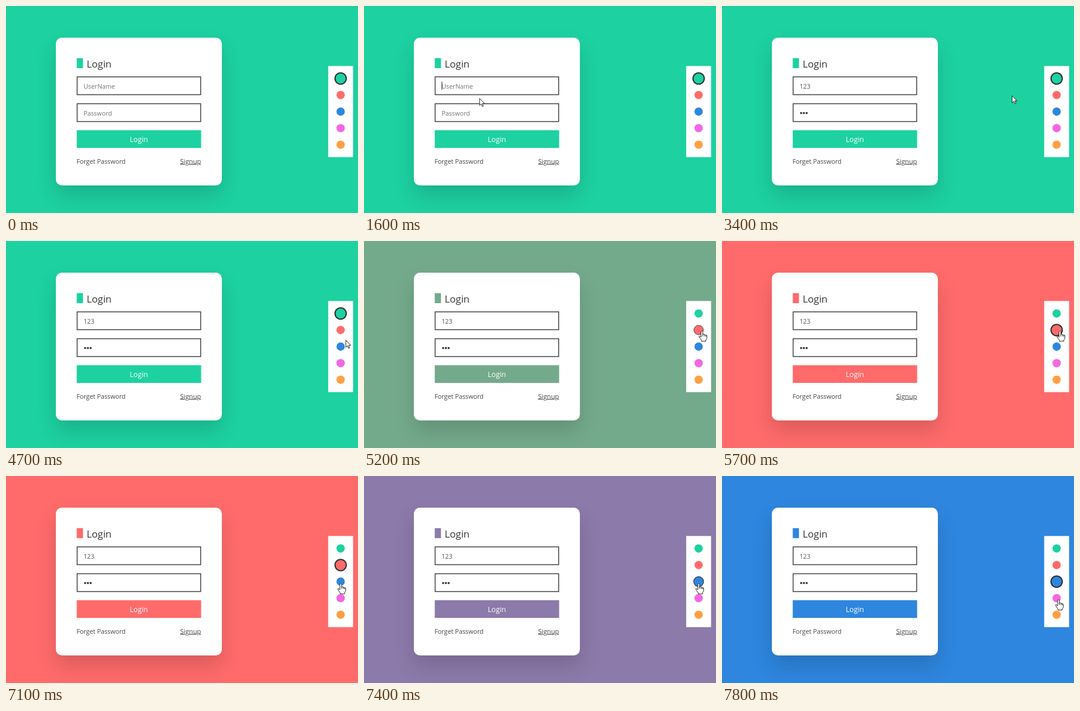
These frames come from a looping animation (600 px wide and 353 px high, 8 s). An HTML page:

```html
<!DOCTYPE html>
<html lang="en">
<head>
<meta charset="utf-8">
<title>Login form with theme picker</title>
<style>
  html, body { margin: 0; width: 100%; height: 100%; overflow: hidden; }
  body { position: relative; background: var(--theme); --theme: #1dd1a1; }
  .card {
    position: absolute; left: 85.3px; top: 53.7px; width: 282.6px; height: 252.6px;
    border-radius: 10.6px; background: #fff; box-shadow: 0 17.6px 35px rgba(0, 0, 0, .15);
  }
  svg { position: absolute; left: 0; top: 0; display: block; }
  text { font: 10.8px "Open Sans", "Noto Sans", sans-serif; fill: #444; }
  .title { font-size: 16.7px; fill: #333; }
  .button { font-size: 12.2px; fill: #fff; text-anchor: middle; }
  .signup { font-size: 11.2px; text-anchor: end; text-decoration: underline; }
  .hint { fill: #757575; }
  .value { fill: #555; }
  .theme { fill: var(--theme); }
  .field { fill: #fff; stroke: #444; stroke-width: 1.5; }
  .cursor path { fill: #fff; stroke: #222; stroke-width: 1; stroke-linejoin: round; }
</style>
</head>
<body>
<div class="card"></div>
<svg width="600" height="353" viewBox="0 0 600 353">
  <rect class="theme" x="120.6" y="89" width="10.6" height="17"/>
  <text class="title" x="137.5" y="104.5">Login</text>

  <rect class="field" x="121.3" y="120.8" width="210.5" height="30.5"/>
  <rect class="field" x="121.3" y="166.6" width="210.5" height="30.5"/>
  <text id="user" x="132.2" y="140.5"></text>
  <text id="passHint" class="hint" x="132.2" y="186.5">Password</text>
  <g id="bullets" fill="#333">
    <circle cx="134.9" cy="182.6" r="1.8"/>
    <circle cx="139.6" cy="182.6" r="1.8"/>
    <circle cx="144.3" cy="182.6" r="1.8"/>
  </g>
  <rect id="caret" width="1" height="14" fill="#222"/>

  <rect class="theme" x="120.6" y="211.8" width="212" height="30.2"/>
  <text class="button" x="226.5" y="232">Login</text>
  <text x="120.2" y="268.5">Forget Password</text>
  <text class="signup" x="332.4" y="268.5">Signup</text>

  <rect x="549.2" y="102.3" width="42.4" height="155.4" fill="#fff"/>
  <g id="dots"></g>

  <g id="cursor" class="cursor">
    <path id="arrow" d="M.5 .5V12.6L3.3 10 5.2 14.3 7.1 13.5 5.2 9.3H9Z"/>
    <path id="beam" d="M-2-6.5H2M0-6.5V6.5M-2 6.5H2"/>
    <path id="hand" d="M-1.5 1.5Q0-1 1.5 1.5V7L2 6Q3.8 5.2 4.4 6.8 6 6 6.6 7.6 8.2 7 8.4 9V12.5Q8 14.5 6.5 16V18H-.8V16.3L-4.6 11Q-5.6 8.8-3.6 9L-1.5 11ZM1.5 7V9.5M4.4 6.8V9.7M6.6 7.6V10"/>
  </g>
</svg>
<script>
const $ = id => document.getElementById(id);
const LOOP = 8000, STEP = 100, FADE = 500;
const palette = [[29, 209, 161], [255, 107, 107], [46, 134, 222], [243, 104, 224], [255, 159, 67]];
const picks = [{ at: -FADE, color: 0 }, { at: 5080, color: 1 }, { at: 7240, color: 2 }];
const userKeys = [1900, 2100, 2300];
const passKeys = [2700, 2850, 3000];

// Pointer stops: time, x, y
const stops = [
  [700, 108, 103], [1100, 160, 134], [1300, 184, 137], [1500, 194, 140],
  [1600, 196.5, 157], [2400, 376, 274], [2600, 384, 282], [3400, 494, 152.5],
  [3700, 494, 152.5], [4400, 579, 170], [4650, 579, 170], [4950, 576, 153],
  [6250, 576, 153], [6700, 578, 233], [7100, 570.5, 183],
  [7400, 570.5, 183], [7800, 573.5, 210.5]
];

const dotX = 570.4, dotY = i => 123.6 + i * 28.25;
const rgb = c => `rgb(${c.map(Math.round)})`;
const show = (el, on) => el.style.display = on ? "" : "none";
const typed = (keys, t) => keys.filter(k => t >= k).length;

const dots = palette.map((color, i) => {
  const dot = document.createElementNS("http://www.w3.org/2000/svg", "circle");
  dot.setAttribute("cx", dotX);
  dot.setAttribute("cy", dotY(i));
  dot.setAttribute("fill", rgb(color));
  dot.setAttribute("stroke", "#2d3436");
  return $("dots").appendChild(dot);
});

// CSS "ease": cubic-bezier(.25, .1, .25, 1)
function ease(x) {
  if (x <= 0) return 0;
  if (x >= 1) return 1;
  const bezier = (a, b, s) => 3 * a * s * (1 - s) ** 2 + 3 * b * s * s * (1 - s) + s ** 3;
  let low = 0, high = 1;
  for (let i = 0; i < 20; i++) {
    const mid = (low + high) / 2;
    if (bezier(.25, .25, mid) < x) low = mid; else high = mid;
  }
  return bezier(.1, 1, low);
}

function pointerAt(t) {
  const next = stops.findIndex(s => s[0] > t);
  if (next < 0) return stops[stops.length - 1].slice(1);
  const [t0, x0, y0] = stops[next - 1], [t1, x1, y1] = stops[next];
  const k = (t - t0) / (t1 - t0), s = k * k * (3 - 2 * k);
  return [x0 + (x1 - x0) * s, y0 + (y1 - y0) * s];
}

function drawTheme(t) {
  const current = picks.filter(p => t >= p.at).length - 1;
  const { at, color } = picks[current];
  const from = palette[picks[Math.max(0, current - 1)].color];
  const k = ease((t - at) / FADE);
  document.body.style.setProperty("--theme", rgb(from.map((v, i) => v + (palette[color][i] - v) * k)));
  dots.forEach((dot, i) => {
    const ring = i === color ? k : 0;
    dot.setAttribute("r", 7.1 + 2.5 * ring);
    dot.setAttribute("stroke-width", 2.1 * ring);
  });
}

function drawFields(t) {
  const userCount = typed(userKeys, t), passCount = typed(passKeys, t);
  $("user").textContent = "123".slice(0, userCount) || "UserName";
  $("user").setAttribute("class", userCount ? "value" : "hint");
  show($("passHint"), !passCount);
  [...$("bullets").children].forEach((b, i) => show(b, i < passCount));

  const inPassword = t >= 2500;
  show($("caret"), t >= 1400 && t < 3300);
  $("caret").setAttribute("x", 132.3 + (inPassword ? passCount * 4.7 : userCount * 6.2));
  $("caret").setAttribute("y", inPassword ? 175 : 129);
}

function drawPointer(t) {
  show($("cursor"), t >= stops[0][0]);
  if (t < stops[0][0]) return;
  const [x, y] = pointerAt(t);
  const inside = (top, bottom) => x > 120 && x < 333 && y > top && y < bottom;
  const hand = palette.some((_, i) => Math.hypot(x - dotX, y - dotY(i)) < 7.5) || inside(212, 242);
  const beam = inside(120, 152) || inside(166, 198);
  $("cursor").setAttribute("transform", `translate(${x} ${y})`);
  show($("hand"), hand);
  show($("beam"), beam);
  show($("arrow"), !hand && !beam);
}

function frame() {
  const t = Math.floor(performance.now() % LOOP / STEP) * STEP;
  drawTheme(t);
  drawFields(t);
  drawPointer(t);
  requestAnimationFrame(frame);
}
frame();
</script>
</body>
</html>
```
